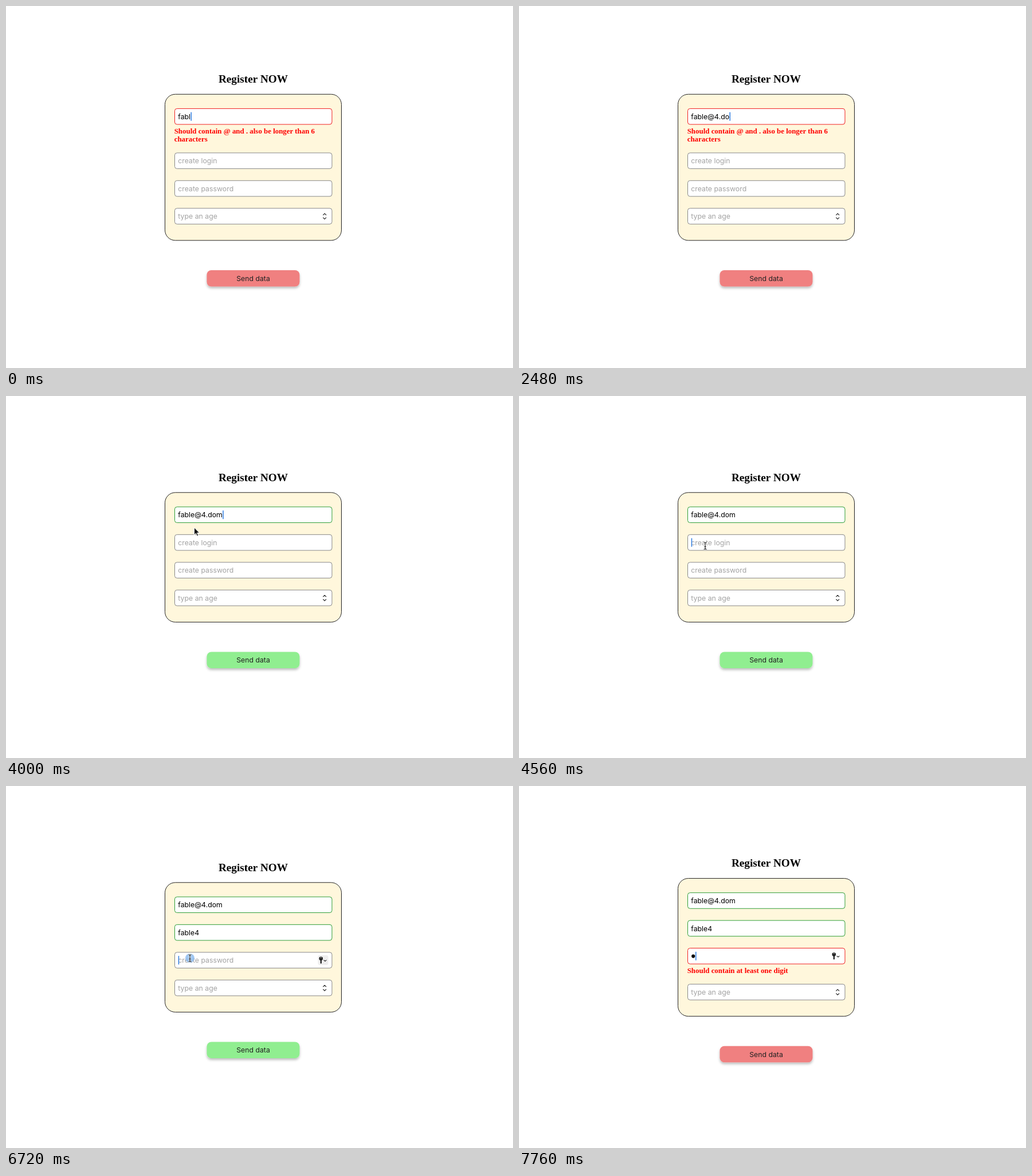
Animation of 885 by 633 pixels, one loop 8 s. Source, as an HTML page:

```html
<!DOCTYPE html>
<html lang="en">
<head>
<meta charset="utf-8">
<title>Register</title>
<style>
  html, body { margin: 0; width: 100%; height: 100%; overflow: hidden; background: #fff; }
  svg { display: block; width: 885px; height: 633px; }
  text { font: 12.3px Inter, "Noto Sans", sans-serif; white-space: pre; }
  .title { font: bold 19.3px "Liberation Serif", "Times New Roman", serif; }
  .error { font: bold 12.9px "Liberation Serif", "Times New Roman", serif; fill: #f00; }
  .line { fill: none; stroke: #222; stroke-width: 1.2; stroke-linecap: round; stroke-linejoin: round; }
</style>
</head>
<body>
<svg id="stage" viewBox="0 0 885 633" xmlns="http://www.w3.org/2000/svg">
  <defs>
    <filter id="shadow" x="-10%" y="-30%" width="120%" height="180%">
      <feDropShadow dx="0" dy="3" stdDeviation="2" flood-color="#000" flood-opacity=".26"/>
    </filter>
  </defs>
</svg>
<script>
const LOOP = 8000, STEP = 80, LINE = 14.5, ROW = 48.45;
const stage = document.getElementById('stage');

function add(tag, attrs, parent = stage) {
  const node = document.createElementNS('http://www.w3.org/2000/svg', tag);
  set(node, attrs);
  return parent.appendChild(node);
}
function set(node, attrs) {
  for (const key in attrs) node.setAttribute(key, attrs[key]);
}
function show(node, visible) {
  node.style.display = visible ? '' : 'none';
}
function write(node, value) {
  if (node.textContent !== value) node.textContent = value;
}
function shift(node, x, y) {
  set(node, { transform: `translate(${x} ${y})` });
}

const title = add('text', { class: 'title', x: 431.5, 'text-anchor': 'middle' });
title.textContent = 'Register NOW';
const card = add('rect', { x: 277.5, width: 308, rx: 18, fill: '#fff7dc', stroke: '#222', 'stroke-width': 1 });

// Each field group has its origin at the middle of the input's left edge.
const fields = ['create login', 'create login', 'create password', 'type an age'].map((hint, i) => {
  const group = add('g', {});
  return {
    group,
    hint: i ? hint : '',
    box: add('rect', { x: .5, y: -13.8, width: 274.5, height: 27.6, rx: 4, fill: '#fff' }, group),
    label: add('text', { x: 6.3, y: 4.6 }, group),
    errors: [29.5, 44].map(y => add('text', { class: 'error', x: -.3, y }, group))
  };
});
add('path', { class: 'line', d: 'M259.7 -2.2l2.5 -2.5l2.5 2.5M259.7 2.6l2.5 2.5l2.5 -2.5' }, fields[3].group);

const dot = add('circle', { cx: 10.2, cy: .2, r: 3.1 }, fields[2].group);
const keyIcon = add('g', {}, fields[2].group);
const keyPad = add('rect', { x: 250.5, y: -8.5, width: 18, height: 17, rx: 3, fill: '#eee' }, keyIcon);
add('circle', { cx: 255.8, cy: -2.8, r: 3.3, fill: '#222' }, keyIcon);
add('circle', { cx: 255.8, cy: -4.3, r: .8, fill: '#fff' }, keyIcon);
add('path', { d: 'M254.7 -1h2.3v6l-1.1 1.4l-1.2 -1.4z', fill: '#222' }, keyIcon);
add('path', { class: 'line', d: 'M261 0l2 1.8l2 -1.8' }, keyIcon);

const button = add('g', {});
add('rect', { x: 350.5, y: -14.3, width: 162, height: 28.6, rx: 8, filter: 'url(#shadow)' }, button);
const buttonText = add('text', { x: 431.5, y: 4.6, 'text-anchor': 'middle', fill: '#222' }, button);
buttonText.textContent = 'Send data';

const caret = add('rect', { width: 1.5, height: 15, fill: '#2f7de1' });
const halo = add('circle', { r: 8, fill: '#8fbdf0', opacity: .85 });
const pointer = add('g', {});
const beam = add('g', {}, pointer);
const beamPath = 'M-2.5 -6Q0 -6 0 -4.5Q0 -6 2.5 -6M0 -4.5V4.5M-2.5 6Q0 6 0 4.5Q0 6 2.5 6M-1.5 1.5H1.5';
add('path', { d: beamPath, fill: 'none', stroke: '#fff', 'stroke-width': 2.6 }, beam);
add('path', { d: beamPath, fill: 'none', stroke: '#111', 'stroke-width': 1.1 }, beam);
const arrow = add('path', { d: 'M0 0V13L3 10.2L5 15L7.2 14L5.2 9.4H9.2Z', fill: '#111', stroke: '#fff' }, pointer);

const email = 'fable@4.dom', login = 'fable4';
const emailKeys = [80, 1040, 1280, 1920, 2240, 2480, 2800];
const loginKeys = [4880, 5040, 5280, 5440, 5600, 5840];
const passwordKey = 7600;
const digitError = ['Should contain at least one digit'];
const emailError = ['Should contain @ and . also be longer than 6', 'characters'];
const moves = [
  { start: 3680, end: 4400, hide: 4880, from: [331, 207], to: [325, 262] },
  { start: 6240, end: 6640, hide: passwordKey, from: [325, 262], to: [321, 301] }
];

const typed = (keys, t) => keys.filter(key => t >= key).length;
const between = (t, a, b) => t >= a && t < b;

function drawPointer(t) {
  const move = moves.find(m => between(t, m.start, m.hide));
  show(pointer, move);
  show(halo, between(t, 4400, 4560) || between(t, 6640, 6800));
  if (!move) return;
  const u = Math.min(1, (t - move.start) / (move.end - move.start));
  const ease = u * u * (3 - 2 * u);
  const [x, y] = move.from.map((v, i) => v + (move.to[i] - v) * ease);
  const onField = Math.abs((y - 207.6 + ROW / 2) % ROW - ROW / 2) < 14;
  shift(pointer, x, y);
  set(halo, { cx: x, cy: y });
  show(beam, onField);
  show(arrow, !onField);
}

function draw(now) {
  const t = Math.floor(now % LOOP / STEP) * STEP;
  const loginCount = typed(loginKeys, t);
  const emailCount = 4 + typed(emailKeys, t);
  const hasPassword = t >= passwordKey;
  const values = [email.slice(0, emailCount), login.slice(0, loginCount), hasPassword ? ' ' : '', ''];
  const errors = [
    emailCount < email.length ? emailError : [],
    loginCount && loginCount < login.length ? digitError : [],
    hasPassword ? digitError : [],
    []
  ];
  const extra = errors.flat().length * LINE;
  const lift = extra / 2;
  const focus = t < 4480 ? 0 : t < 6640 ? 1 : 2;

  set(title, { y: 148.5 - lift });
  set(card, { y: 168.8 - lift, height: 226.6 + extra });
  shift(button, 0, 461.7 + lift);
  set(button.firstChild, { fill: extra ? '#f08080' : '#90ee90' });

  let y = 207.7 - lift;
  fields.forEach((field, i) => {
    const value = values[i], bad = errors[i].length;
    shift(field.group, 294, y);
    set(field.box, { stroke: bad ? '#f02020' : value ? '#2f9e38' : '#888' });
    set(field.label, { fill: value ? '#000' : '#a3a3a3' });
    write(field.label, value || field.hint);
    field.errors.forEach((node, k) => write(node, errors[i][k] || ''));
    if (i === focus) {
      const width = i === 2 ? (hasPassword ? 7.3 : 0) : value ? field.label.getComputedTextLength() : 0;
      set(caret, { x: 300.7 + width, y: y - 7.5 });
    }
    y += ROW + bad * LINE;
  });

  show(caret, !between(t, 3280, 3680));
  show(dot, hasPassword);
  show(keyIcon, focus === 2);
  show(keyPad, !hasPassword);
  drawPointer(t);
}

const begin = performance.now();
function tick() {
  draw(performance.now() - begin);
  requestAnimationFrame(tick);
}
tick();
</script>
</body>
</html>
```
